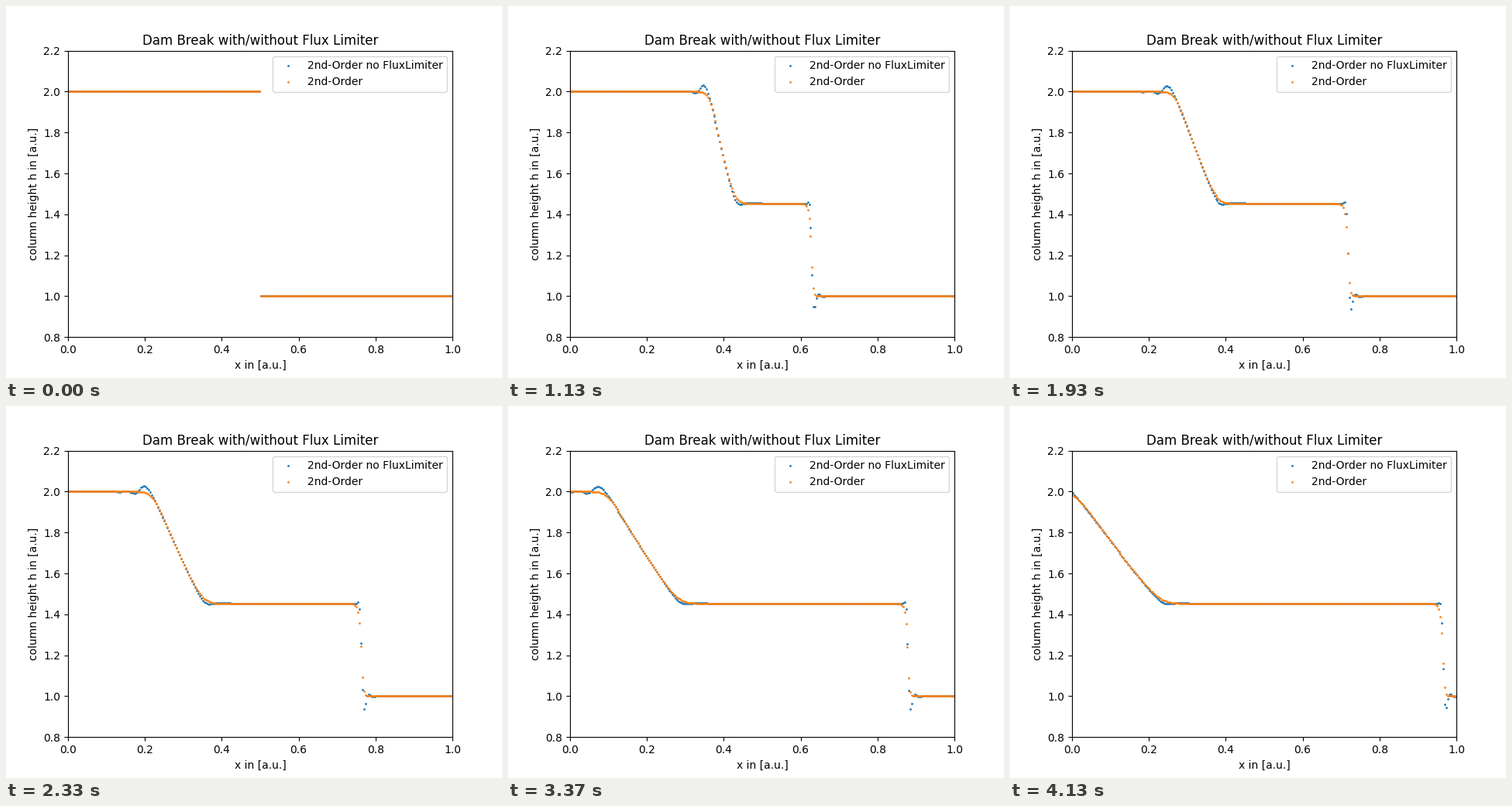
A matplotlib script for the animation above (4.16 s loop, 640x480 px).

```python
import numpy as np
import matplotlib.pyplot as plt
from matplotlib.animation import FuncAnimation

CELLS = 250
DX = 1 / CELLS
DT = 0.35 * DX
STEPS_PER_STATE = 2
STATES = 125
FRAMES, INTERVAL = 208, 20


def central(a, b):
    return (a + b) / 2


def minmod(a, b):
    return np.where(a * b > 0, np.sign(a) * np.minimum(abs(a), abs(b)), 0)


def flux(q):
    h, m = q
    return np.array([m, m * m / h + h * h / 2])


def speed(q):
    return abs(q[1] / q[0]) + np.sqrt(q[0])


def rate(q, slope):
    """Finite-volume time derivative with linear reconstruction."""
    p = np.pad(q, ((0, 0), (2, 2)), mode="edge")
    d = np.diff(p)
    s = slope(d[:, :-1], d[:, 1:])
    mid = p[:, 1:-1]
    left = (mid + s / 2)[:, :-1]
    right = (mid - s / 2)[:, 1:]
    a = np.maximum(speed(left), speed(right))
    f = (flux(left) + flux(right) - a * (right - left)) / 2
    return -np.diff(f) / DX


def dam_break(slope):
    """Column heights at every stored state, advanced with Heun's method."""
    q = np.array([np.where(x < 0.5, 2.0, 1.0), np.zeros(CELLS)])
    heights = [q[0]]
    for _ in range(STATES - 1):
        for _ in range(STEPS_PER_STATE):
            k1 = rate(q, slope)
            k2 = rate(q + DT * k1, slope)
            q = q + DT * (k1 + k2) / 2
        heights.append(q[0])
    return heights


x = (np.arange(CELLS) + 0.5) * DX
runs = [
    ("2nd-Order no FluxLimiter", dam_break(central)),
    ("2nd-Order", dam_break(minmod)),
]

fig, ax = plt.subplots(figsize=(6.4, 4.8), dpi=100)
dots = [ax.scatter(x, heights[0], s=1, label=name) for name, heights in runs]
ax.set(
    xlim=(0, 1),
    ylim=(0.8, 2.2),
    xlabel="x in [a.u.]",
    ylabel="column height h in [a.u.]",
    title="Dam Break with/without Flux Limiter",
)
ax.legend(loc="upper right")


def update(frame):
    # States advance at 30 per second, sampled mid-frame.
    state = int(0.6 * frame + 0.45)
    for dot, (_, heights) in zip(dots, runs):
        dot.set_offsets(np.column_stack([x, heights[state]]))
    return dots


anim = FuncAnimation(fig, update, frames=FRAMES, interval=INTERVAL,
                     repeat=True, repeat_delay=0, blit=False)
plt.show()
```
